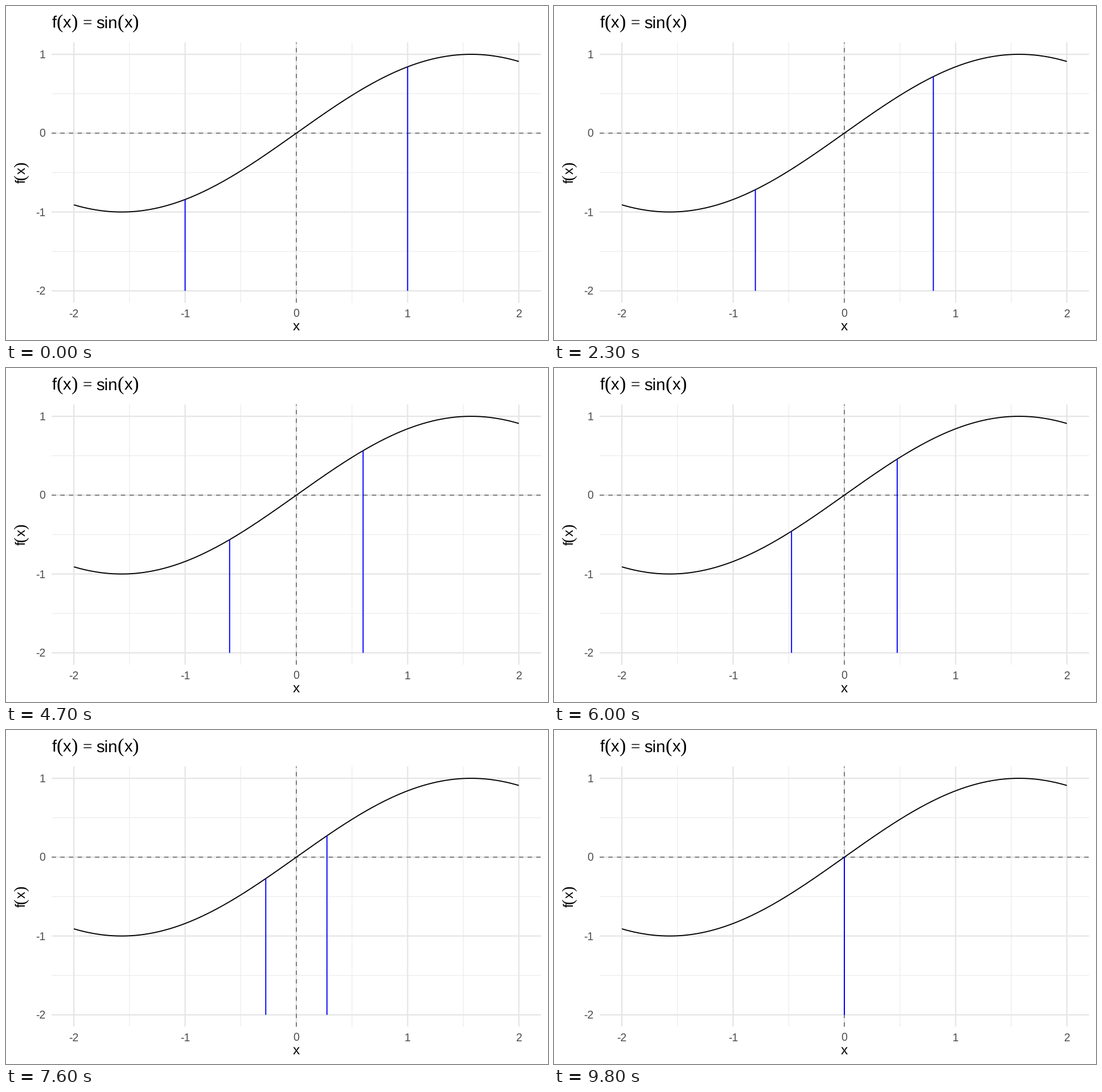
A matplotlib script for the animation above (10000 ms loop, 952 by 588 pixels).

```python
import numpy as np
import matplotlib.pyplot as plt
from matplotlib.animation import FuncAnimation

plt.rcParams["path.snap"] = False
plt.rcParams["text.hinting"] = "none"

W, H, DPI = 952, 588, 100
PX = 72 / DPI                            # points per pixel
LEFT, RIGHT, TOP, BOTTOM = 80.2, 939.8, 64.2, 522.3
X0, XU = 510.0, 195.4                    # plot origin and units in pixels
Y0, YU = 223.85, 138.8
SMALL, LABEL, TITLE = 19.56, 24.44, 29.33
SANS, SERIF = "Liberation Sans", "Liberation Serif"

fig = plt.figure(figsize=(W / DPI, H / DPI), dpi=DPI, facecolor="white")
ax = fig.add_axes([0, 0, 1, 1])
ax.set_xlim(0, W)
ax.set_ylim(H, 0)
ax.axis("off")


def px(x):
    return X0 + XU * x


def py(y):
    return Y0 - YU * y


def line(xs, ys, color, width, **kw):
    kw.setdefault("solid_capstyle", "butt")
    return ax.plot(xs, ys, color=color, lw=width * PX, **kw)[0]


def hline(y, color, width, **kw):
    line([LEFT, RIGHT], [py(y)] * 2, color, width, **kw)


def vline(x, color, width, **kw):
    line([px(x)] * 2, [BOTTOM, TOP], color, width, **kw)


def text(x, y, s, size, color="black", font=SANS, **kw):
    ax.text(x, y, s, fontsize=size * PX, color=color, family=font,
            va="baseline", parse_math=False, **kw)


def formula(x, y, parts, size, vertical=False):
    """Set glyph runs one after another, with taller serif brackets."""
    pos = 0
    for s, advance in parts:
        bracket = s in "()"
        at = (x, y - pos) if vertical else (x + pos, y)
        text(*at, s, size * (1.18 if bracket else 1),
             font=SERIF if bracket or s == "=" else SANS,
             ha="left", rotation=90 if vertical else 0,
             rotation_mode="anchor")
        pos += advance * size


# Grid
for x in np.arange(-1.5, 2, 1):
    vline(x, "#ebebeb", 1.19)
for y in np.arange(-1.5, 1, 1):
    hline(y, "#ebebeb", 1.19)
for x in range(-2, 3):
    vline(x, "#e6e6e6", 2.37)
    text(px(x), 547.8, str(x), SMALL, "#4d4d4d", ha="center")
for y in range(-2, 2):
    hline(y, "#e6e6e6", 2.37)
    text(69.2, py(y) + 7, str(y), SMALL, "#4d4d4d", ha="right")

# Titles
call = [("(", 0.393), ("x", 0.5), (")", 0.393)]
f_of_x = [("f", 0.278)] + call
gap = [(" ", 0.278)]
formula(80.2, 38.5, f_of_x + gap + [("=", 0.549)] + gap
        + [("sin", 1.278)] + call, TITLE)
formula(34, 312.4, f_of_x, LABEL, vertical=True)
text(X0, 570.6, "x", LABEL, ha="center")

# Zero lines and curve
dashed = dict(linestyle=(0, (4, 4)), dash_capstyle="butt")
hline(0, "#7a7a7a", 1.9, **dashed)
vline(0, "#7a7a7a", 1.9, **dashed)
t = np.linspace(-2, 2, 201)
line(px(t), py(np.sin(t)), "black", 1.9)

bars = [line([], [], "blue", 1.9) for _ in range(2)]


def step_at(ms):
    """Steps last 300 ms at first, then 200 ms."""
    if ms < 200:
        return 0
    if ms < 5600:
        return 1 + (ms - 200) // 300
    return 19 + (ms - 5600) // 200


def update(frame):
    x = 1 - step_at(frame * 100) / 40
    for bar, side in zip(bars, (-x, x)):
        bar.set_data([px(side)] * 2, [py(-2), py(np.sin(side))])
    return bars


anim = FuncAnimation(fig, update, frames=100, interval=100,
                     repeat=True, repeat_delay=0)
plt.show()
```
